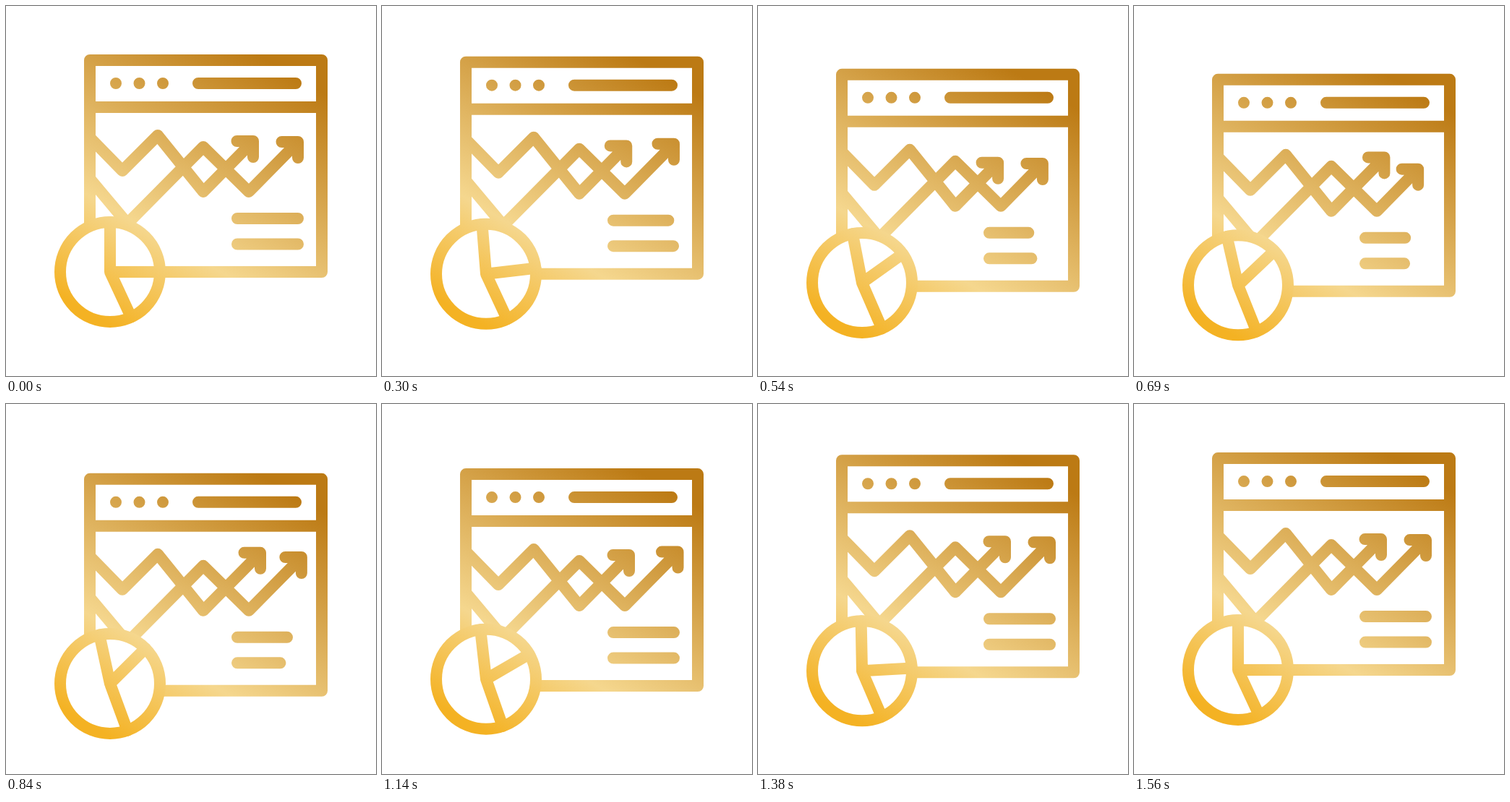
An HTML page that plays this animation: 512x512 px, repeating every 1620 ms.

```html
<!DOCTYPE html>
<html>
<head>
<meta charset="utf-8">
<style>
  html, body { margin: 0; height: 100%; overflow: hidden; background: #fff; }
  svg { display: block; width: 100vw; height: 100vh; }
</style>
</head>
<body>
<svg viewBox="0 0 512 512">
  <defs>
    <linearGradient id="gold" gradientUnits="userSpaceOnUse" x1="-155" y1="268.5" x2="57.5" y2="-99.6">
      <stop offset="0" stop-color="#f4b223"/>
      <stop offset=".33" stop-color="#f5d78e"/>
      <stop offset="1" stop-color="#bc7a14"/>
    </linearGradient>
  </defs>
  <g fill="none" stroke="url(#gold)" stroke-width="16" stroke-linecap="round" stroke-linejoin="round">
    <g id="panel">
      <path d="M116 75H437V368H116ZM116 140H437M266 107H401M152 107h.01M184.5 107h.01M217 107h.01"/>
      <path id="chart"/>
      <path id="bars"/>
    </g>
    <g id="pie">
      <circle cx="144" cy="368" r="69" fill="#fff"/>
      <path id="spokes"/>
    </g>
  </g>
</svg>
<script>
const LOOP = 1620, TICK = 30;
const $ = id => document.getElementById(id);

// Cubic ease-in-out and smoothstep from 0 to 1 between steps a and b
const unit = (k, a, b) => Math.min(1, Math.max(0, (k - a) / (b - a)));
const cubic = (k, a, b) => {
  const u = unit(k, a, b);
  return u < .5 ? 4 * u ** 3 : 1 - 4 * (1 - u) ** 3;
};
const smooth = (k, a, b) => {
  const u = unit(k, a, b);
  return u * u * (3 - 2 * u);
};
// Rise between a and b, fall between c and d
const pulse = (ease, k, a, b, c, d) => ease(k, a, b) * (1 - ease(k, c, d));

// Pull back, overshoot, settle
const swing = (k, amp) =>
  amp * (2 * cubic(k, 14, 22.5) - cubic(k, 3, 14) - cubic(k, 23, 31));

const arrow = (x, y, d) =>
  `L${x + d} ${y - d}M${x + d - 22.5} ${y - d}h22.5v22`;

const spoke = deg => {
  const a = deg * Math.PI / 180;
  return `M144 368l${69 * Math.cos(a)} ${69 * Math.sin(a)}`;
};

function draw(time) {
  // 25 fps motion sampled on a 30 fps grid
  const k = Math.floor(Math.floor(time % LOOP / TICK) * 5 / 6);
  const drop = pulse(cubic, k, 0, 24, 21, 44);

  $('panel').setAttribute('transform', `translate(0 ${29 * pulse(cubic, k, 1, 25.5, 22, 45)})`);
  $('pie').setAttribute('transform', `translate(0 ${19 * drop})`);

  $('chart').setAttribute('d',
    'M116 182L161 228L210 179L273 257' + arrow(342, 187, swing(k, 10)) +
    'M116 239L168 301L273 195L336 257' + arrow(404, 188, swing(k - 4, 11)));

  $('bars').setAttribute('d',
    `M320 294H${404 - 30 * pulse(cubic, k, 2, 17, 16, 30)}` +
    `M320 329.5H${404 - 30 * pulse(cubic, k, 5, 20, 18, 32)}`);

  $('spokes').setAttribute('d',
    spoke(-90 - 13 * pulse(smooth, k, 0, 20, 20, 42)) +
    spoke(-45 * drop) +
    spoke(65 + 6 * pulse(smooth, k, 8, 29, 29, 43)));
}

const start = performance.now();
function frame() {
  draw(performance.now() - start);
  requestAnimationFrame(frame);
}
frame();
</script>
</body>
</html>
```
